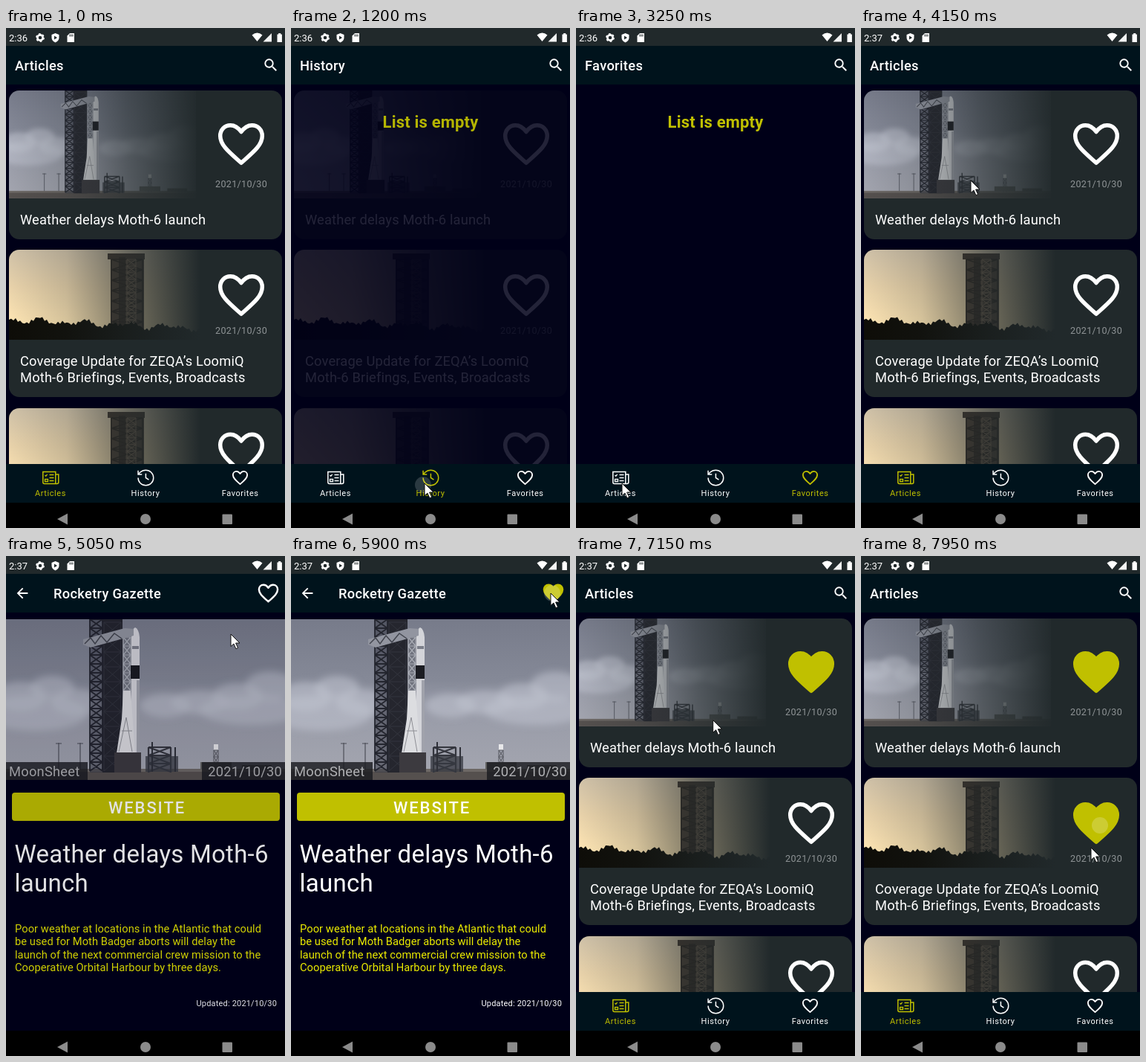
An HTML page that plays this animation: 376 px wide and 672 px high, repeating every 8 s.

```html
<!DOCTYPE html>
<html lang="en">
<head>
<meta charset="utf-8">
<title>Rocketry Gazette</title>
<style>
html, body { margin: 0; width: 100%; height: 100%; overflow: hidden; background: #000018; }
svg { display: block; width: 100vw; height: 100vh; }
svg svg { width: auto; height: auto; }
text { font-family: Roboto, "Noto Sans", sans-serif; fill: #fff; white-space: pre; }
.head { font-size: 18.3px; font-weight: 500; letter-spacing: .32px; }
.item { font-size: 18.3px; letter-spacing: .17px; }
.date { font-size: 12.6px; letter-spacing: .3px; fill: #8f9496; }
.tab { font-size: 11px; letter-spacing: .55px; text-anchor: middle; fill: inherit; }
.label { font-size: 18.3px; letter-spacing: .25px; fill: #b0b1b4; }
.big { font-size: 33px; letter-spacing: .25px; }
.body { font-size: 14.7px; letter-spacing: .05px; fill: #ebeb00; }
</style>
</head>
<body>
<svg id="stage" viewBox="0 0 376 672" preserveAspectRatio="none"></svg>
<script>
const CARD = '#21292b', BAR = '#00131c', BACK = '#000018', YELLOW = '#c0c000';
const LOOP = 8000;
const $ = id => document.getElementById(id);

const rect = (x, y, w, h, fill, more = '') =>
  `<rect x="${x}" y="${y}" width="${w}" height="${h}" fill="${fill}" ${more}/>`;
const path = (d, fill, more = '') => `<path d="${d}" fill="${fill}" ${more}/>`;
const line = (d, color, width) => path(d, 'none', `stroke="${color}" stroke-width="${width}"`);
const text = (x, y, cls, s, more = '') => `<text x="${x}" y="${y}" class="${cls}" ${more}>${s}</text>`;
const at = (x, y, k, body, more = '') => `<g transform="translate(${x} ${y}) scale(${k})" ${more}>${body}</g>`;
const blob = (x, y, rx, ry, fill, o) =>
  `<ellipse cx="${x}" cy="${y}" rx="${rx}" ry="${ry}" fill="${fill}" opacity="${o}"/>`;
const clip = (id, x, y, w, h, r = 0) => `<clipPath id="${id}">${rect(x, y, w, h, '#fff', `rx="${r}"`)}</clipPath>`;
const gradient = (id, dir, stops) => `<linearGradient id="${id}" x2="${dir === 'x' ? 1 : 0}" y2="${dir === 'y' ? 1 : 0}">` +
  stops.map(([o, c, a = 1]) => `<stop offset="${o}" stop-color="${c}" stop-opacity="${a}"/>`).join('') + '</linearGradient>';

// Heart around its own centre, 62 by 56 with the stroke.
const HEART = 'M0-16.5C-4-22-9-25.300-14.500-25.300C-22.500-25.300-28.300-19-28.300-11C-28.300 2-15 12 0 25.300C15 12 28.300 2 28.300-11C28.300-19 22.500-25.300 14.500-25.300C9-25.300 4-22 0-16.500z';
const heart = (id, x, y, k, color = '#fff') => at(x, y, k,
  `<path id="${id}" d="${HEART}" fill="none" stroke="${color}" stroke-width="5.500" stroke-linejoin="round"/>`);
function setHeart(id, on) {
  $(id).setAttribute('fill', on ? YELLOW : 'none');
  $(id).setAttribute('stroke', on ? YELLOW : '#fff');
}

// Crossed girders between two uprights.
function lattice(x, y, w, h, step, color, width) {
  let d = `M${x} ${y}v${h}M${x + w} ${y}v${h}`;
  for (let k = 0; k + step <= h; k += step)
    d += `M${x} ${y + k}h${w}l${-w} ${step}M${x} ${y + k}l${w} ${step}`;
  return line(d, color, width);
}

function padPhoto() {
  let s = rect(0, 0, 376, 216, 'url(#greySky)');
  const puffs = [[20, 104, 34, 20], [62, 92, 30, 16], [95, 112, 34, 18], [40, 126, 70, 24],
    [215, 116, 34, 16], [262, 112, 40, 16], [312, 104, 34, 18], [356, 90, 34, 20], [330, 122, 70, 20]];
  s += '<g filter="url(#soft)">' + puffs.map(([x, y, a, b]) => blob(x, y, a, b, '#bcc0cc', .6)).join('') + '</g>';
  s += line('M71 166v40M100 166v40M67 167h8M96 167h8', '#4d4f58', 1.2);
  s += rect(0, 202, 376, 14, '#55504e') + rect(0, 201, 376, 4, '#6d6865');
  s += rect(130, 0, 27, 206, '#25262e') + rect(113, 0, 17, 206, '#373a46', 'opacity=".55"');
  s += lattice(113, 0, 17, 204, 12, '#23252e', 1.8) + lattice(132, 4, 23, 200, 20, '#33353e', 1);
  s += rect(157, 20, 13, 165, '#6f727d') + lattice(158, 24, 10, 156, 12, '#a9acb5', 1.2);
  s += path('M169 24q1-11 5-13 5 2 6 13v158h-11z', '#d3d4d9') + rect(168, 62, 12, 18, '#1b1c22');
  s += rect(176, 82, 4, 100, '#a0a2ab') + rect(170, 36, 9, 4, '#7b7e89');
  s += path('M104 27l56-15 12 1v9l-58 16-10-4z', '#9295a0') + line('M106 33l8-8 6 8 8-11 8 9 10-12 10 7', '#43464f', 1.5);
  s += path('M158 96h10l6 84h-25l7-46z', '#dcdde0') + line('M152 178l10-46 8 46M156 150h14', '#8d8e94', 1);
  s += rect(146, 179, 36, 27, '#3c3a3f') + lattice(192, 172, 30, 34, 11, '#34363e', 2.2);
  s += rect(188, 184, 44, 21, '#363840', 'opacity=".75"') + line('M197 165v40M228 172v33', '#2e3038', 2);
  s += rect(280, 168, 6, 8, '#e8e8ea') + lattice(280, 176, 6, 28, 9, '#55575f', 1);
  s += rect(262, 192, 42, 10, '#60605f') + rect(318, 196, 40, 7, '#5b5958');
  return s;
}

function duskPhoto() {
  let s = rect(0, 0, 258, 124, 'url(#duskSky)');
  s += rect(137, 10, 45, 114, '#4d4035') + rect(133, 5, 50, 8, '#42362d') + rect(148, 10, 9, 114, '#332a24');
  s += lattice(138, 13, 42, 110, 14, '#2d251f', 1.6) + lattice(159, 13, 12, 108, 9, '#776553', 1);
  let d = 'M0 124V94';
  for (let x = 0; x <= 258; x += 3)
    d += `L${x} ${(94 + x * .045 + 2.5 * Math.sin(x * .11) + 2.5 * Math.sin(x * 1.9) + 2 * Math.sin(x * 3.3)).toFixed(1)}`;
  return s + path(d + 'V124z', '#0e0d08');
}

function card(n, y, h, photoH, heartY, dateY, photo, lines) {
  return `<g clip-path="url(#card${n})">${rect(4, y, 368, h, CARD)}
    <g id="media${n}"><g clip-path="url(#photo${n})">${at(4, y, 1, photo + rect(0, 0, 258, photoH, 'url(#fade)'))}</g>
    ${heart('heart' + n, 317, heartY, 1)}${text(282, dateY, 'date', '2021/10/30')}</g>
    ${lines.map((s, i) => text(19, y + photoH + 35 + i * 22, 'item', s)).join('')}</g>`;
}
const cardClips = (n, y, h, photoH) => clip('card' + n, 4, y, 368, h, 14) + clip('photo' + n, 4, y, 258, photoH);
const briefing = ['Coverage Update for ZEQA’s LoomiQ', 'Moth-6 Briefings, Events, Broadcasts'];
const dusk = '<use href="#dusk"/>';

const statusBar = rect(0, 0, 376, 24, CARD) +
  text(4, 18, '', '2:36', 'id="clock" font-size="13"') +
  `<circle cx="46" cy="13" r="3.6" fill="none" stroke="#fff" stroke-width="2.6"/>
   <circle cx="46" cy="13" r="5" fill="none" stroke="#fff" stroke-width="1.8" stroke-dasharray="2.6 2.64"/>` +
  path('M66.500 7l5 2v4q0 4-5 6.500q-5-2.500-5-6.500V9z', '#fff') + path('M65 10.500l4 2.500-4 2.500z', CARD) +
  path('M86 7h6v12h-9.500v-8.500z', '#fff') + line('M86 8.500v3M88 8.500v3M90 8.500v3', CARD, 1) +
  path('M331.500 9.500q7-6 14 0l-7 8.500z', '#fff') + path('M358 7v11.500h-11.500z', '#fff', 'opacity=".95"') +
  path('M365.500 8.500h1.700V7h3v1.500h1.700V19h-6.400z', '#fff');

const systemBar = rect(0, 638, 376, 34, '#000') + path('M83 652.500v15l-14-7.500z', '#8b8b8b') +
  '<circle cx="188" cy="660" r="7" fill="#8b8b8b"/>' + rect(291.500, 653.500, 13.500, 13.500, '#8b8b8b', 'rx="1"');

const stroke = 'fill="none" stroke="currentColor"';
const tabs = `<g id="tabs">${rect(0, 586, 376, 52, BAR)}
  <g id="tab0"><g ${stroke} stroke-width="1.5"><path d="M49.800 596.500h17v16h-15q-2 0-2-2zM66.800 600h4v10.500q0 2-2 2h-3"/>
    <path d="M52.500 601l1.200 1.200 2-2.400M52.500 606.500h4v3h-4zM58.500 600.500h6M58.500 604.500h6M58.500 608.500h6" stroke-width="1.300"/></g>
    ${text(60, 629, 'tab', 'Articles')}</g>
  <g id="tab1">${at(174.600, 590.700, 1.15, '<path d="M3 12a9 9 0 1 0 9-9 9.750 9.750 0 0 0-6.740 2.740L3 8M3 3.500V8h4.500M12 7v5l3.500 2.200"/>', stroke + ' stroke-width="1.3"')}
    ${text(188, 629, 'tab', 'History')}</g>
  <g id="tab2">${heart('tabHeart', 315.500, 604.500, .34, 'currentColor')}
    ${text(315.700, 629, 'tab', 'Favorites')}</g></g>`;

const detail = `<g id="detail" clip-path="url(#host)">
  ${at(0, 85, 1, '<use href="#pad"/>')}
  ${rect(0, 277, 110, 24, '#1a1c20', 'opacity=".82"')}${rect(264, 277, 112, 24, '#1a1c20', 'opacity=".82"')}
  ${text(4, 296, 'label', 'MoonSheet')}${text(372, 296, 'label', '2021/10/30', 'text-anchor="end"')}
  ${rect(8, 318, 361, 38, YELLOW, 'rx="4"')}
  ${text(190, 345.500, '', 'WEBSITE', 'text-anchor="middle" font-size="22" font-weight="500" letter-spacing="1.9"')}
  ${text(11.500, 412, 'big', 'Weather delays Moth-6')}${text(11.500, 451, 'big', 'launch')}
  ${['Poor weather at locations in the Atlantic that could', 'be used for Moth Badger aborts will delay the',
    'launch of the next commercial crew mission to the', 'Cooperative Orbital Harbour by three days.']
    .map((s, i) => text(12, 506 + i * 17.4, 'body', s)).join('')}
  ${text(365, 604.500, '', 'Updated: 2021/10/30', 'text-anchor="end" font-size="11" letter-spacing=".18"')}</g>`;

$('stage').innerHTML = `<defs>
  ${gradient('greySky', 'y', [[0, '#777b8a'], [.38, '#858997'], [.52, '#979aa7'], [.95, '#a3a5af']])}
  ${gradient('duskSky', 'y', [[0, '#cfc1a8'], [.4, '#e8d2aa'], [.8, '#ffe6b4']])}
  ${gradient('fade', 'x', [[0, CARD, 0], [.3, CARD, .18], [.62, CARD, .6], [1, CARD]])}
  <filter id="soft" x="-20%" width="140%" y="-50%" height="200%"><feGaussianBlur stdDeviation="5"/></filter>
  <clipPath id="host"><rect id="hostBox" y="76" width="376" height="562"/></clipPath>
  ${clip('listBox', 0, 76, 376, 510)}
  ${cardClips(1, 84, 200, 145)}${cardClips(2, 298, 198, 121)}${cardClips(3, 511, 198, 121)}
  <clipPath id="padBox">${rect(0, 0, 376, 216, '#fff')}</clipPath>
  <g id="pad" clip-path="url(#padBox)">${padPhoto()}</g><g id="dusk">${duskPhoto()}</g></defs>
  ${rect(0, 0, 376, 672, BACK)}
  <g id="list" clip-path="url(#listBox)">
    ${card(1, 84, 200, 145, 156, 214, '<use href="#pad" transform="scale(.671)"/>', ['Weather delays Moth-6 launch'])}
    ${card(2, 298, 198, 121, 359, 411, dusk, briefing)}
    ${card(3, 511, 198, 121, 571.500, 624, dusk, briefing)}</g>
  ${text(188, 134, '', 'List is empty', 'id="empty" text-anchor="middle" font-size="22" font-weight="700" letter-spacing=".18" style="fill:#c0c000"')}
  ${detail}${statusBar}${rect(0, 24, 376, 52, BAR)}
  ${text(12, 57, 'head', '', 'id="title"')}
  <g id="search">${at(345.500, 38.500, .95, path('M15.500 14h-.79l-.28-.27A6.470 6.470 0 0 0 16 9.500 6.500 6.500 0 1 0 9.500 16c1.610 0 3.090-.590 4.230-1.570l.27.28v.79l5 4.990L20.490 19zM9.500 14A4.500 4.500 0 1 1 9.500 5a4.500 4.500 0 0 1 0 9z', '#fff'))}</g>
  <g id="tools">${at(11, 39, .92, path('M20 11H7.830l5.590-5.590L12 4l-8 8 8 8 1.410-1.410L7.830 13H20z', '#fff'))}${heart('heart0', 353.500, 50, .445)}</g>
  ${tabs}${systemBar}
  <circle id="ripple" fill="#fff"/>
  <g id="cursor">${path('M0 0V16.500L3.900 13l3 6.700 2.700-1.200-3-6.500H12z', '#fff', 'stroke="#111" stroke-width="1"')}</g>`;

// cubic-bezier(.4, 0, .2, 1)
function ease(x) {
  if (x <= 0) return 0;
  if (x >= 1) return 1;
  let lo = 0, hi = 1, u;
  for (let i = 0; i < 20; i++) {
    u = (lo + hi) / 2;
    const bx = 3 * u * (1 - u) ** 2 * .4 + 3 * u * u * (1 - u) * .2 + u ** 3;
    if (bx < x) lo = u; else hi = u;
  }
  return 3 * u * u * (1 - u) + u ** 3;
}

// Pointer stops: time, x, y.
const stops = [[50, 186, 674], [400, 180, 612], [1450, 180, 612], [1950, 318, 612], [2500, 318, 612],
  [3100, 62, 612], [3650, 62, 612], [4100, 148, 205], [4650, 148, 205], [5050, 303, 105], [5300, 350, 50],
  [5900, 350, 50], [6450, 14, 44], [6650, 14, 44], [6850, 46, 78], [7450, 322, 362], [7750, 322, 362], [7900, 310, 392]];
const clicks = [[850, 178, 614], [2150, 318, 612], [3450, 62, 612], [4450, 148, 205],
  [5600, 352, 50], [6550, 15, 44], [7700, 322, 362]];

function pointer(t) {
  const i = stops.findIndex(s => s[0] > t);
  if (i < 0) return stops[stops.length - 1].slice(1);
  if (i === 0) return [stops[0][1], 690];
  const [a, ax, ay] = stops[i - 1], [b, bx, by] = stops[i];
  const p = (t - a) / (b - a), k = p * p * (3 - 2 * p);
  return [ax + (bx - ax) * k, ay + (by - ay) * k];
}

function draw(t) {
  const ramp = (start, length) => ease((t - start) / length);
  const show = (id, on) => $(id).setAttribute('visibility', on ? 'visible' : 'hidden');
  const fade = (id, a) => { $(id).setAttribute('opacity', a.toFixed(3)); show(id, a > .001); };

  fade('list', 1 - ramp(850, 600) + ramp(3500, 600) - ramp(4500, 400) + ramp(6600, 350));
  fade('empty', ramp(850, 500) - ramp(3500, 400));
  fade('detail', ramp(4500, 900) - ramp(6850, 300));

  const reading = t >= 4500 && t < 6600;
  const settling = t >= 6600 && t < 6900;
  const tab = t < 850 || t >= 3500 ? 0 : t < 2150 ? 1 : 2;
  $('title').textContent = reading ? 'Rocketry Gazette' : ['Articles', 'History', 'Favorites'][tab];
  $('title').setAttribute('x', reading ? 64 : 12);
  $('clock').textContent = t < 3800 ? '2:36' : '2:37';
  $('hostBox').setAttribute('height', t < 6600 ? 562 : 510);
  // The last card is laid out late when the list returns.
  $('media3').setAttribute('transform', `translate(0 ${settling ? 69 : 0})`);
  show('search', !reading);
  show('tools', reading);
  show('tabs', !reading && !settling);
  for (let i = 0; i < 3; i++) {
    const color = i === tab ? YELLOW : '#fff';
    $('tab' + i).setAttribute('color', color);
    $('tab' + i).setAttribute('fill', color);
  }
  setHeart('heart0', t >= 5650);
  setHeart('heart1', t >= 5650);
  setHeart('heart2', t >= 7750);

  const hit = clicks.find(c => t >= c[0] && t < c[0] + 600);
  show('ripple', hit);
  if (hit) {
    const p = (t - hit[0]) / 600;
    $('ripple').setAttribute('cx', hit[1]);
    $('ripple').setAttribute('cy', hit[2]);
    $('ripple').setAttribute('r', 4 + 7 * Math.min(1, p * 2.5));
    $('ripple').setAttribute('opacity', .2 * Math.min(1, 2 - 2 * p));
  }
  const [x, y] = pointer(t);
  $('cursor').setAttribute('transform', `translate(${x.toFixed(2)} ${y.toFixed(2)})`);
}

const begin = performance.now();
function tick() {
  draw((performance.now() - begin) % LOOP);
  requestAnimationFrame(tick);
}
tick();
</script>
</body>
</html>
```
